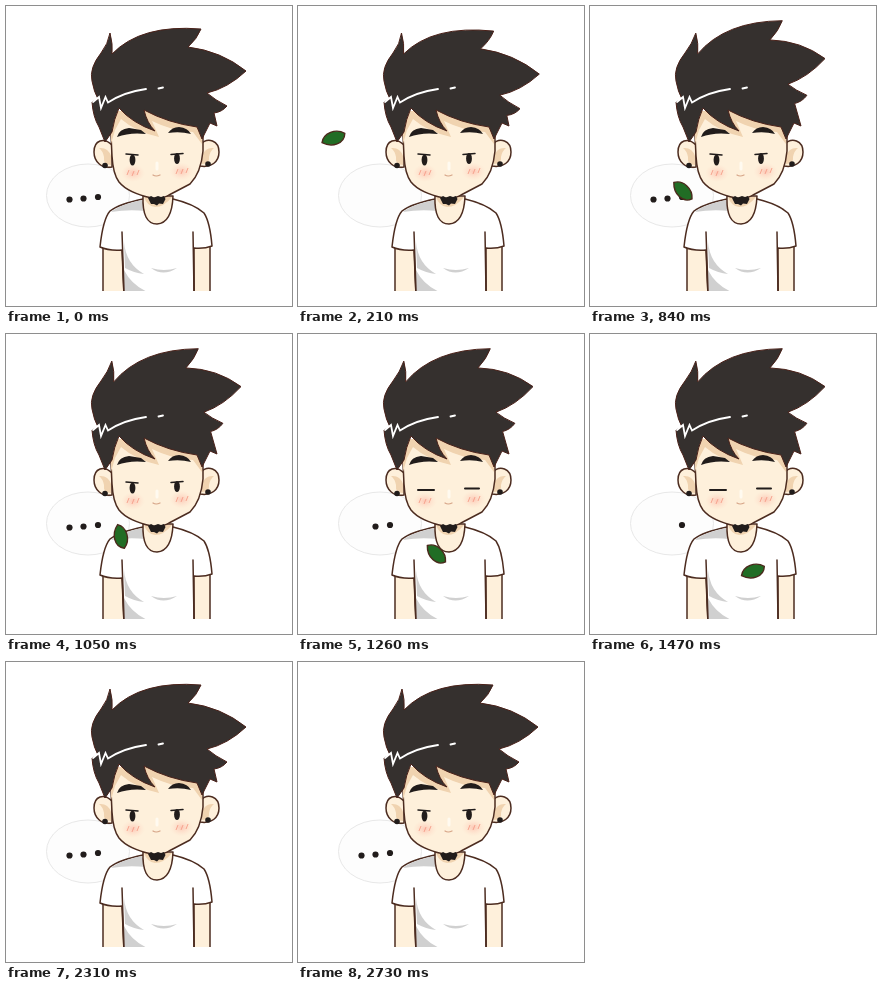
Animation, 286 px wide and 300 px high, one loop 2940 ms. Source, as an HTML page:

```html
<!DOCTYPE html>
<html lang="en">
<head>
<meta charset="utf-8">
<title>Leaf drifting past</title>
<style>
html, body { margin: 0; width: 100%; height: 100%; overflow: hidden; background: #fff; }
svg { display: block; width: 286px; height: 300px; }
.line { fill: none; stroke: #4c2c20; stroke-width: 1.5; stroke-linecap: round; stroke-linejoin: round; }
.skin { fill: #fef0db; }
.white { fill: #fff; }
.shade { fill: #d0d0d0; }
.tan { fill: #f0d3b0; }
.ink { fill: #211c1b; }
</style>
</head>
<body>
<svg viewBox="0 0 286 300">
  <defs>
    <radialGradient id="blush">
      <stop offset="0" stop-color="#fdc8b6"/>
      <stop offset="1" stop-color="#fee0cc" stop-opacity="0"/>
    </radialGradient>
    <clipPath id="floor"><path d="M0 0H286V285H0Z"/></clipPath>
  </defs>

  <ellipse cx="82" cy="189.500" rx="41.500" ry="31.500" fill="#fdfdfd" stroke="#e8e8e8"/>
  <g id="dots" class="ink">
    <circle cx="63.500" cy="193.500" r="3.100"/>
    <circle cx="77.500" cy="192.500" r="3.100"/>
    <circle cx="92" cy="191" r="3.100"/>
  </g>

  <g clip-path="url(#floor)">
    <path class="line skin" d="M97 238V290H118L116 235ZM204 238V290H188L187 233Z"/>
    <path class="line white" d="M137 193Q113 198 104 205Q97 213 94 241Q103 245 116 244L118 290H188V242Q198 243 206 240Q204 216 198 207Q188 198 167 193Z"/>
    <path class="shade" d="M136 194Q113 199 105 206Q122 203 140 205ZM118 236Q120 258 138 268Q128 267 119 262ZM118 264Q126 280 144 287H118ZM145 262Q158 266 171 262Q157 271 145 262Z"/>
    <path class="line" d="M116 226L118 285M187 226L188 285"/>
    <path class="line skin" d="M137 190Q136 218 151 218Q166 217 167 190Z"/>
    <path class="tan" d="M138 191H166Q158 201 149 201Q141 200 138 191Z"/>
  </g>

  <g class="line skin">
    <path d="M106 139C98 131 88 134 88 146C88 156 96 163 106 161Z"/>
    <path d="M194 139C202 130 213 135 213 146C213 156 205 162 194 160Z"/>
  </g>
  <path class="tan" d="M93 142Q102 141 105 150V159Q97 159 98 151Q97 145 93 142ZM208 142Q199 141 196 150V158Q204 158 203 151Q204 145 208 142Z"/>
  <circle class="ink" cx="99" cy="159.500" r="2.800"/>
  <circle class="ink" cx="202" cy="158" r="2.800"/>
  <path class="line skin" d="M104 108L106 150Q107 168 113 176Q122 187 146 192Q157 193 163 189L184 178Q195 167 197 145V108Z"/>
  <path class="tan" d="M105 105V138L109 124L115 113Q130 126 153 131L146 115Q166 125 187 126L196 138V105Z"/>

  <ellipse cx="127" cy="167" rx="12" ry="9" fill="url(#blush)"/>
  <ellipse cx="175.500" cy="165.500" rx="12" ry="9" fill="url(#blush)"/>
  <path d="M121 169l2-5M126 170l2-5M131 169l2-5M170 168l2-5M175 168l2-5M180 167l2-5" stroke="#f7a48f"/>
  <path class="ink" d="M111 131Q113 123 123 122L135 124L140 128Q124 126 111 131ZM162 127Q166 121 173 121Q182 122 185 128Q174 125 162 127Z"/>
  <path d="M151 157v6" stroke="#fffaf0" stroke-width="3" stroke-linecap="round"/>
  <path class="line" d="M147 169Q150 171 154 169" style="stroke:#d6a487;stroke-width:1.200"/>
  <path class="ink" d="M142 192L145 190L148 191.500L152 190L155 191L158 190L159.500 193L157 198L153 197.500L151 199.500L148 198L145 198Z"/>
  <g id="open">
    <path class="line" d="M120 148L132 149M165 148.500L177 147.500" style="stroke:#211c1b"/>
    <ellipse class="ink" cx="126.500" cy="154" rx="2.900" ry="5.500"/>
    <ellipse class="ink" cx="171" cy="152.500" rx="2.900" ry="5.500"/>
  </g>
  <path id="shut" class="line" d="M120 156H136M167 154.500H181" style="stroke:#211c1b;stroke-width:2"/>

  <path id="hair" fill="#35302e" stroke="#4a2119" stroke-linejoin="round"/>
  <path d="M87 96L93 91L95 102L99.500 91L102 96.500Q118 86 140 83M152.500 82.500L157 81.500" fill="none" stroke="#fff" stroke-width="1.800" stroke-linecap="round"/>
  <g clip-path="url(#floor)">
    <path id="leaf" d="M-12 2C-9 -7 4 -10 12 -3C10 7 -3 9 -12 2Z" fill="#216d25" stroke="#4a2a1c" stroke-width="1.400"/>
  </g>
</svg>
<script>
const STEP = 210, COUNT = 14;
const $ = id => document.getElementById(id);
const show = (el, on) => el.style.display = on ? '' : 'none';
const dots = [...$('dots').children];

// Crown of the hair: the wind moves these points, the fringe stays put.
const crown = 'M104 27Q107 38 106 48Q135 18 195 23Q191 33 182 41Q215 45 240 65' +
  'Q222 82 201 87Q209 94 221 100Q216 106 208 107';
const fringe = 'L211 120L204 117L196 133L191 121Q162 117 138 104Q141 117 149 125Q126 117 113 102' +
  'Q108 113 106 126L99 136L93 121Q87 111 86 96L92 93Q88 86 86 75Q83 62 95 47Q102 38 ';

function hairPath(lift) {
  const bend = (_, x, y) => {
    const dx = -(x - 140) * 0.05, dy = -(x - 105) * 0.092;
    return (+x + dx * lift).toFixed(1) + ' ' + (+y + dy * lift).toFixed(1);
  };
  const top = crown.replace(/(\d+) (\d+)/g, bend);
  const tip = top.slice(1, top.indexOf('Q'));
  return top + fringe + tip + 'Z';
}

// The hair sags as the leaf comes near, then the gust raises it.
function gust(k) {
  if (k >= 4 && k <= 8 || k === 10) return 1;
  return k >= 1 && k <= 3 ? -0.25 : 0;
}

function draw(ms) {
  const k = Math.floor(ms / STEP) % COUNT;
  $('hair').setAttribute('d', hairPath(gust(k)));

  // Dots type in one by one, then go out from the left.
  const full = k < 1 || k > 8;
  dots.forEach((dot, i) => show(dot, full || i < k - 1 && i >= k - 5));

  const shut = k === 6 || k === 7;
  show($('open'), !shut);
  show($('shut'), shut);

  // The leaf falls steadily, gains speed sideways and rocks.
  const u = k - 3;
  const x = 72 + 19.75 * u + 0.75 * u * u, y = 167.5 + 17.5 * u;
  const turn = 22 + 64 * Math.cos((u - 2) * Math.PI / 3);
  show($('leaf'), k >= 1 && k <= 10);
  $('leaf').setAttribute('transform', `translate(${x} ${y}) rotate(${turn})`);
}

const start = performance.now();
function tick(now) {
  draw(Math.max(0, now - start));
  requestAnimationFrame(tick);
}
draw(0);
requestAnimationFrame(tick);
</script>
</body>
</html>
```
